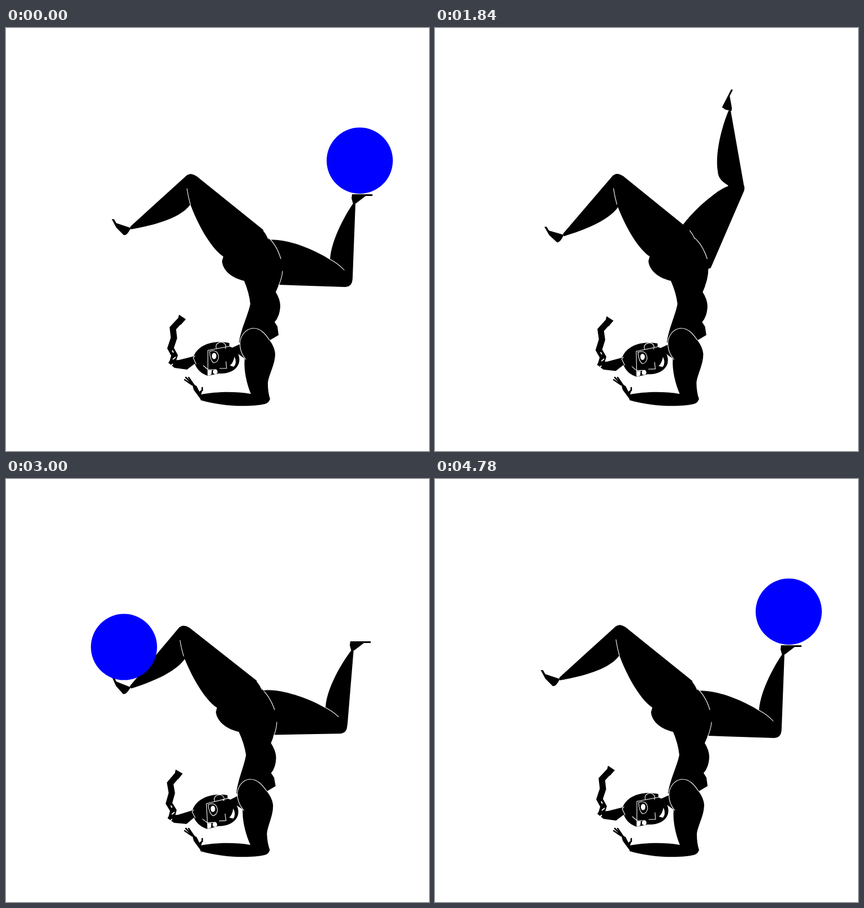
Recreate the animation shown at these times as an HTML page. Size 748 by 748 pixels, loop 4800 ms.

```html
<!DOCTYPE html>
<html lang="en">
<head>
<meta charset="utf-8">
<title>Handstand juggler</title>
<style>
  html, body { margin: 0; width: 100%; height: 100%; overflow: hidden; background: #fff; }
  svg { display: block; width: 100vw; height: 100vh; }
  .line { fill: none; stroke: #fff; stroke-width: 1.1; stroke-linecap: round; stroke-linejoin: round; }
  .dash { fill: none; stroke: #fff; stroke-width: 1.8; }
  .white { fill: #fff; }
  .braid { fill: none; stroke: #000; stroke-width: 11; }
  .finger { fill: none; stroke: #000; stroke-width: 2.6; stroke-linecap: round; }
</style>
</head>
<body>
<svg viewBox="0 0 748 748">
  <g id="rightThigh">
    <g id="rightShank">
      <path d="M573 410C574 385 590 345 614 310L618 309 613 440Q613 452 603 457L583 436Q570 424 573 410Z"/>
      <path id="rightFoot" d="M614 312L611 301 612 294 648 294V297H636L619 310Z"/>
    </g>
    <path d="M440 390L468 374C500 372 548 393 573 409Q588 417 598 428L612 438Q615 457 600 458L452 453 440 440Z"/>
    <path class="line" d="M468 374C500 372 548 393 573 409Q588 417 598 428"/>
  </g>

  <g id="torso">
    <path d="M412 556C416 530 428 508 432 488Q430 468 421 447C402 443 383 430 382 412L385 402 463 370C476 380 484 395 487 410Q491 438 477 467Q485 480 485 492Q484 510 475 520L480 528 482 543 465 553Z"/>
    <path class="line" d="M463 370C475 380 482 395 486 408M489 430Q488 442 482 456"/>
  </g>

  <g id="leftThigh">
    <g id="leftShank">
      <path d="M220 351L318 262Q326 255 334 261L345 280 337 296Q332 306 326 312C308 338 255 350 221 356Z"/>
      <path id="leftFoot" d="M224 350L219 353 195 345 191 338H187L195 353 208 366Q213 368 219 357Z"/>
    </g>
    <path d="M320 284Q322 298 326 312C338 344 360 387 384 404L430 440 474 400Q472 380 463 370L455 357 337 262Q327 255 318 262Z"/>
    <path class="line" d="M320 284Q322 298 326 312M455 358Q461 365 464 373"/>
  </g>

  <g id="head">
    <path d="M396 567L414 559 424 586 407 574Z"/>
    <path d="M332 580C340 561 364 551 395 557V563C409 568 415 581 412 592C408 606 392 612 376 611L357 615C343 611 331 598 332 580Z"/>
    <path class="braid" d="M308 517L295 531 297 548 291 566 298 579 294 592"/>
    <path d="M306 507L318 515 309 525 303 518ZM334 580L306 587 290 588 287 592 298 601 320 604 336 592Z"/>
    <path class="line" d="M334 580L331 583 336 594M357 614V570L400 562M372 567C369 558 377 555 383 556Q391 559 388 567M349 597L357 604H372M389 590L390 602H378M360 572Q375 567 376 583 374 592 367 592 361 588 360 572"/>
    <path class="white" d="M404 581Q409 592 403 599L396 597Q402 592 404 581ZM357 605H364L363 613 357 615Z"/>
    <ellipse class="white" cx="368" cy="580" rx="4" ry="5.5"/>
    <circle class="white" cx="370" cy="608" r="4"/>
    <path class="dash" d="M294 570L296 574M295 586L300 582M291 598L295 594"/>
  </g>

  <g id="arm">
    <path d="M414 553C418 538 428 531 438 531C450 531 458 540 466 552Q475 564 476 576C476 595 465 612 463 627Q463 645 467 656 464 664 457 665C430 671 380 669 344 658L345 648C370 643 405 642 433 647C426 630 420 605 422 585Q412 572 414 553Z"/>
    <path class="line" d="M424 586Q412 572 414 553C418 538 428 531 438 531C450 531 458 540 466 552"/>
  </g>
  <path d="M329 629L337 633 342 643 348 638 345 648 346 659 332 640Z"/>
  <path class="finger" d="M316 622L329 631M318 618L331 631M323 618L334 634M347 636V641"/>

  <circle id="ball" r="58.5" fill="#00f"/>
</svg>

<script>
const LOOP = 4800, THROW = 520, FLIGHT = 600;
const $ = id => document.getElementById(id);

// Each joint turns by degrees per unit of: sway, own dip, own kick, other dip, other kick
const right = {
  name: 'right', start: 1100, arc: 406,
  parts: [
    { name: 'Thigh', pivot: [451, 409], turn: [-0.27, 20, -76, 0, 0] },
    { name: 'Shank', pivot: [602, 446], turn: [0.23, 17, -15, 0, 0] },
    { name: 'Foot', pivot: [616, 306], turn: [0, 0, -71, 0, 0] }
  ],
  hold: (sway, dip) => [625.5 + 23 * dip, 234.5 - 0.6 * sway + 64 * dip]
};
const left = {
  name: 'left', start: 3005, arc: 272,
  parts: [
    { name: 'Thigh', pivot: [430, 396], turn: [-0.06, -13, 14.3, 8, 0.5] },
    { name: 'Shank', pivot: [327, 270], turn: [-0.7, -6, 55, 8, -4.4] },
    { name: 'Foot', pivot: [221, 353], turn: [0.3, 0, 40.6, 12, -4] }
  ],
  hold: (sway, dip) => [213 - 0.4 * sway - 19 * dip, 285 + 1.1 * sway + 48 * dip]
};

function ramp(t, from, to) {
  const p = Math.min(1, Math.max(0, (t - from) / (to - from)));
  return p * p * (3 - 2 * p);
}
// Eases up between a and b, back down between c and d
const bump = (t, a, b, c, d) => ramp(t, a, b) - ramp(t, c, d);

const swayAt = t => 9 * bump(t, 0, 1100, 1400, 2300) + 11 * bump(t, 1800, 2900, 3000, LOOP);
const dipAt = (leg, t) => bump(t - leg.start, 0, 380, THROW, THROW + 100);
const kickAt = (leg, t) => bump(t - leg.start, THROW, 800, 900, 1600);
const heldBall = (leg, t) => leg.hold(swayAt(t), dipAt(leg, t));

function ballAt(t) {
  for (const [thrower, catcher] of [[right, left], [left, right]]) {
    const release = thrower.start + THROW, p = (t - release) / FLIGHT;
    if (p < 0) return heldBall(thrower, t);
    if (p < 1) {
      const from = heldBall(thrower, release), to = heldBall(catcher, release + FLIGHT);
      const [x, y] = from.map((a, i) => a + (to[i] - a) * p);
      return [x, y - thrower.arc * 4 * p * (1 - p)];
    }
  }
  return heldBall(right, t);
}

function poseLeg(leg, other, t) {
  const sway = swayAt(t);
  const weights = [sway, dipAt(leg, t), kickAt(leg, t), dipAt(other, t), kickAt(other, t)];
  let parent = 0;
  for (const { name, pivot, turn } of leg.parts) {
    const angle = turn.reduce((sum, a, i) => sum + a * weights[i], 0);
    const shift = name === 'Thigh' ? -sway : 0;
    $(leg.name + name).setAttribute('transform', `translate(${shift} 0) rotate(${angle - parent} ${pivot})`);
    parent = angle;
  }
}

function draw() {
  const t = performance.now() % LOOP, sway = swayAt(t), lean = sway / 256;
  for (const id of ['torso', 'arm']) $(id).setAttribute('transform', `matrix(1 0 ${lean} 1 ${-665 * lean} 0)`);
  $('head').setAttribute('transform', `translate(${-sway * 0.25} ${sway * 0.1}) rotate(${-sway * 0.28} 410 570)`);
  poseLeg(right, left, t);
  poseLeg(left, right, t);
  const [x, y] = ballAt(t);
  $('ball').setAttribute('cx', x);
  $('ball').setAttribute('cy', y);
  requestAnimationFrame(draw);
}
draw();
</script>
</body>
</html>
```
